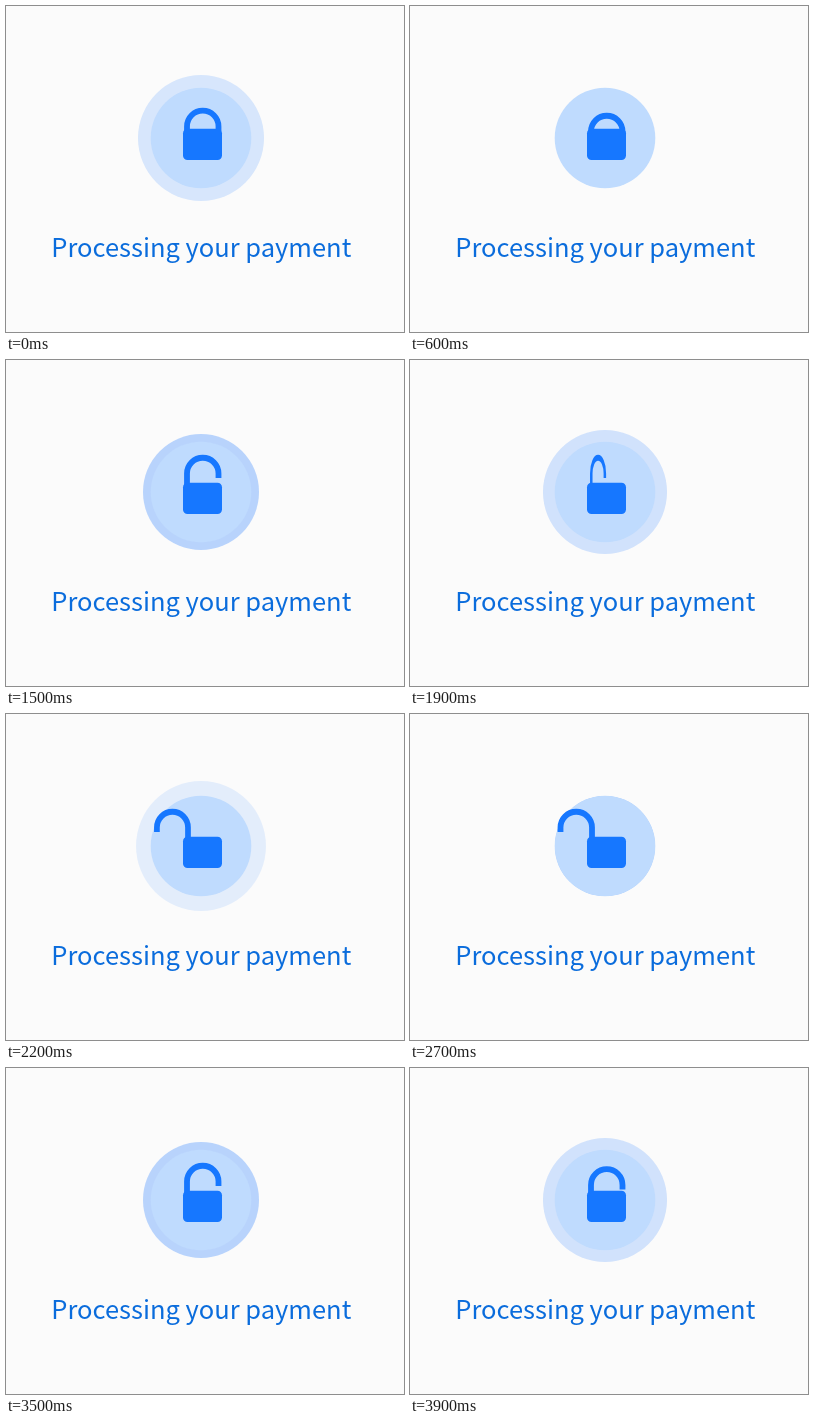
Animation of 398x326 px, one loop 4 s. Source, as an HTML page:

```html
<!DOCTYPE html>
<html lang="en">
<head>
<meta charset="utf-8">
<title>Processing</title>
<style>
  html, body { margin: 0; width: 100%; height: 100%; overflow: hidden; background: #fbfbfb; }
  svg { display: block; }
  text { font: 25.5px "Noto Sans CJK JP", "Noto Sans CJK SC", "Noto Sans CJK", "Noto Sans", sans-serif; fill: #0a6cdc; }
</style>
</head>
<body>
<svg width="398" height="326" viewBox="0 0 398 326">
  <circle id="ring" cx="195" cy="132" r="50" fill="#0d6efd"/>
  <circle cx="195" cy="132" r="50.3" fill="#bfdbfe"/>
  <path id="shackle" d="M181 127V113.5a15.75 15.75 0 0 1 31.5 0V118" fill="none" stroke="#1677ff" stroke-width="5.8"/>
  <rect x="177" y="122.7" width="39" height="31.3" rx="4.5" fill="#1677ff"/>
  <text x="195.3" y="251" text-anchor="middle">Processing your payment</text>
</svg>
<script>
  const LOOP = 4000, PULSE = 2000, GROW = 1500, SHRINK = 400;
  const HINGE = 181.5, DROP = 12;
  const ring = document.getElementById('ring');
  const shackle = document.getElementById('shackle');

  const clamp = x => Math.min(1, Math.max(0, x));

  // Eased 0..1 progress of a 500 ms move
  function move(t, start) {
    const p = clamp((t - start) / 500);
    return p * p * (3 - 2 * p);
  }

  function drawRing(t) {
    const age = (t + PULSE - 700) % PULSE;
    const grow = clamp(age / GROW);
    const back = 1 - clamp((age - GROW) / SHRINK);
    ring.setAttribute('r', 50 + 15 * grow * back);
    ring.setAttribute('fill-opacity', (0.48 - 0.38 * grow) * back);
  }

  function drawShackle(t) {
    const u = (t + LOOP - 725) % LOOP;
    const drop = DROP * (1 - move(u, 0) + move(u, 3000));
    const flip = 1 - 2 * (move(u, 1000) - move(u, 2000));
    shackle.setAttribute('transform',
      `translate(${HINGE} ${drop}) scale(${flip} 1) translate(${-HINGE} 0)`);
  }

  function frame() {
    const t = performance.now() % LOOP;
    drawRing(t);
    drawShackle(t);
    requestAnimationFrame(frame);
  }
  frame();
</script>
</body>
</html>
```
